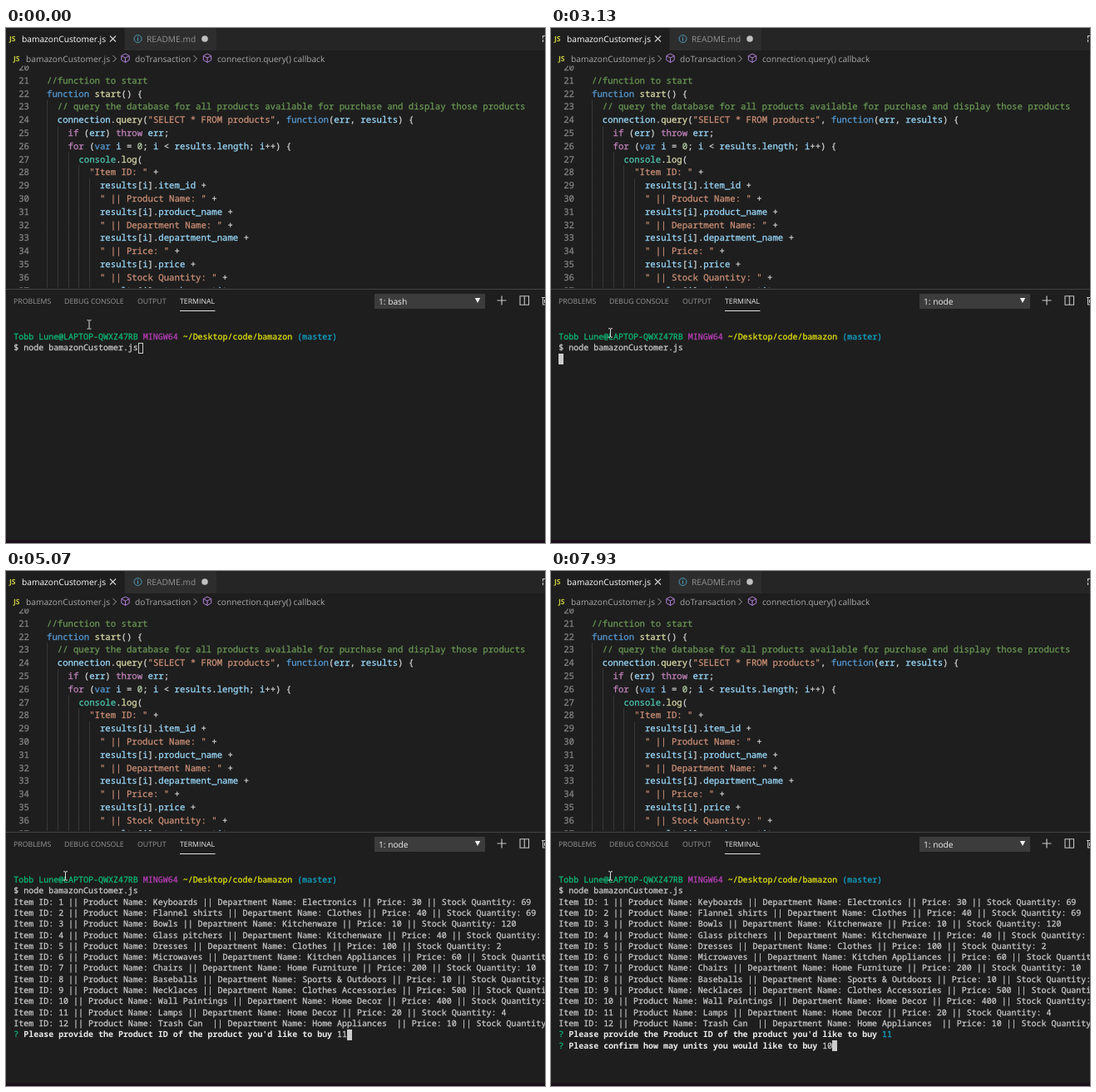
Recreate the animation shown at these times as an HTML page. Size 648 by 620 pixels, loop 8000 ms.

```html
<!DOCTYPE html>
<html lang="en">
<head>
<meta charset="utf-8">
<title>Terminal session</title>
<style>
  html, body { margin: 0; width: 100%; height: 100%; overflow: hidden; background: #1e1e1e; }
  svg { display: block; }
  text { white-space: pre; text-rendering: geometricPrecision; stroke-width: 0; }
  .ui { font: 10.2px "Open Sans", "Noto Sans", sans-serif; }
  .panel { font: 8.75px "Open Sans", "Noto Sans", sans-serif; }
  .icon { font: bold 8.6px "Open Sans", sans-serif; }
  .code { font: 10.66px "Noto Sans Mono", "DejaVu Sans Mono", monospace; stroke-width: .25px; }
  .term { font: 9.97px "Noto Sans Mono", "DejaVu Sans Mono", monospace; stroke-width: .25px; }
  .bold { font-weight: bold; stroke-width: 0; }
</style>
</head>
<body>
<svg id="stage" width="648" height="620" viewBox="0 0 648 620"></svg>
<script>
const LOOP = 8000;
const stage = document.getElementById('stage');

function set(el, attrs) {
  for (const k in attrs) el.setAttribute(k, attrs[k]);
  return el;
}
function add(tag, attrs, parent = stage) {
  const el = set(document.createElementNS('http://www.w3.org/2000/svg', tag), attrs);
  parent.append(el);
  return el;
}
const rect = (x, y, width, height, fill, parent) => add('rect', { x, y, width, height, fill }, parent);
const line = (d, stroke, w = 1, parent) =>
  add('path', { d, stroke, 'stroke-width': w, fill: 'none' }, parent);
// Text is inked with a thin stroke in its own colour where the class asks for it
const ink = color => ({ fill: color, stroke: color });
function text(x, y, str, color, cls, parent) {
  const el = add('text', { x, y, class: cls, ...ink(color) }, parent);
  el.textContent = str;
  return el;
}
// One text line made of [string, colour, class] parts
function rich(x, y, parts, cls, parent) {
  const el = add('text', { x, y, class: cls }, parent);
  for (const [str, color, sub = ''] of parts) {
    add('tspan', { class: sub, ...ink(color) }, el).textContent = str;
  }
  return el;
}

// Code editor
const TOKENS = /(\/\/.*)|("[^"]*")|\b(function|var)\b|\b(if|for|throw)\b|\b(console)\b|(\w+)(?=\()|(\b\d+)|([a-z_]\w*)/gi;
const COLORS = ['#6a9955', '#ce9178', '#569cd6', '#c586c0', '#4ec9b0', '#dcdcaa', '#b5cea8', '#9cdcfe'];
function highlight(src) {
  const parts = [];
  let last = 0;
  for (const m of src.matchAll(TOKENS)) {
    if (m.index > last) parts.push([src.slice(last, m.index), '#d4d4d4']);
    parts.push([m[0], COLORS[m.slice(1).findIndex(g => g !== undefined)]]);
    last = m.index + m[0].length;
  }
  parts.push([src.slice(last), '#d4d4d4']);
  return parts;
}
const field = name => `          results[i].${name} +`;
const label = name => `          " || ${name}: " +`;
const source = [
  '',
  '//function to start',
  'function start() {',
  '  // query the database for all products available for purchase and display those products',
  '  connection.query("SELECT * FROM products", function(err, results) {',
  '    if (err) throw err;',
  '    for (var i = 0; i < results.length; i++) {',
  '      console.log(',
  '        "Item ID: " +',
  field('item_id'), label('Product Name'),
  field('product_name'), label('Department Name'),
  field('department_name'), label('Price'),
  field('price'), label('Stock Quantity'),
  field('stock_quantity')
];
const CODE_X = 49, CODE_ADV = 6.396, CODE_LH = 15.8;
source.forEach((src, i) => {
  const y = 66.8 + (i - 1) * CODE_LH;
  const indent = src.search(/\S|$/);
  for (let c = 0; c < indent; c += 2) {
    rect(Math.round(CODE_X + c * CODE_ADV), y - 11.9, 1, CODE_LH, '#393939');
  }
  set(text(28, y, 20 + i, '#858585', 'code'), { 'text-anchor': 'end' });
  rich(CODE_X, y, highlight(src), 'code');
});

// Tabs
rect(0, 0, 648, 27, '#252526');
rect(0, 0, 142, 27, '#1e1e1e');
rect(143, 0, 110, 27, '#2d2d2d');
text(4, 16.2, 'JS', '#cbcb41', 'icon');
text(19, 17, 'bamazonCustomer.js', '#ffffff', 'ui');
line('M125 9.5l7 7m0-7l-7 7', '#d0d0d0', 1.1);
add('circle', { cx: 158.5, cy: 13, r: 4.5, fill: 'none', stroke: '#519aba' });
line('M158.5 12v3.6m0-5.4v1', '#519aba', 1.2);
text(169, 17, 'README.md', '#929292', 'ui');
add('circle', { cx: 239, cy: 13, r: 3.8, fill: '#c0c0c0' });
line('M648 9.5h-2.5v3M645.5 14v3', '#c5c5c5', 1.2);

// Breadcrumbs
rect(0, 27, 648, 18.5, '#1e1e1e');
text(9, 39.6, 'JS', '#cbcb41', 'icon');
text(24, 40.6, 'bamazonCustomer.js', '#a9a9a9', 'ui');
text(155, 40.6, 'doTransaction', '#a9a9a9', 'ui');
text(254, 40.6, 'connection.query() callback', '#a9a9a9', 'ui');
for (const x of [128.5, 225.5]) line(`M${x} 33l4 4l-4 4`, '#a0a0a0');
for (const x of [143.5, 242]) {
  line(`M${x} 31l4.7 2.5v5.2l-4.7 2.7l-4.7-2.7v-5.2zm-4.7 2.5l4.7 2.5l4.7-2.5m-4.7 2.5v5.4`, '#b180d7');
}

// Panel header
rect(0, 313, 648, 307, '#1e1e1e');
rect(0, 314, 648, 1, '#434343');
[['PROBLEMS', 9], ['DEBUG CONSOLE', 70], ['OUTPUT', 158], ['TERMINAL', 209]].forEach(([name, x]) =>
  text(x, 332.3, name, name === 'TERMINAL' ? '#e7e7e7' : '#979797', 'panel'));
rect(209, 340, 42.5, 1, '#e0e0e0');
rect(443, 320, 133, 18, '#3c3c3c');
const shell = text(448, 332.6, '', '#f0f0f0', 'ui');
add('path', { d: 'M563.8 325h6.4l-3.2 6z', fill: '#f0f0f0' });
line('M590.5 328h11M596 322.5v11', '#c5c5c5', 1.2);
line('M618 322.8h10.5v10.4h-10.5zM623.3 322.8v10.4', '#c5c5c5', 1.1);
line('M644 324.5h4M645.5 324.5v8.5h2.5M647.5 327v4', '#c5c5c5', 1.1);
rect(0, 616.5, 648, 4, '#1a101b');

// Terminal
const TERM_X = 9.3, TERM_ADV = 5.98, TERM_LH = 13.3;
const GREY = '#cccccc', GREEN = '#0dbc79', CYAN = '#11a8cd';
const baseline = row => 375 + row * TERM_LH;
const COMMAND = '$ node bamazonCustomer.js';
rich(TERM_X, baseline(0), [
  ['Tobb Lune@LAPTOP-QWXZ47RB ', GREEN],
  ['MINGW64 ', '#bc3fbc'],
  ['~/Desktop/code/bamazon ', '#e5e510'],
  ['(master)', CYAN]
], 'term');
text(TERM_X, baseline(1), COMMAND, GREY, 'term');

const products = [
  ['Keyboards', 'Electronics', 30, 69],
  ['Flannel shirts', 'Clothes', 40, 69],
  ['Bowls', 'Kitchenware', 10, 120],
  ['Glass pitchers', 'Kitchenware', 40, 20],
  ['Dresses', 'Clothes', 100, 2],
  ['Microwaves', 'Kitchen Appliances', 60, 20],
  ['Chairs', 'Home Furniture', 200, 10],
  ['Baseballs', 'Sports & Outdoors', 10, 50],
  ['Necklaces', 'Clothes Accessories', 500, 10],
  ['Wall Paintings', 'Home Decor', 400, 10],
  ['Lamps', 'Home Decor', 20, 4],
  ['Trash Can ', 'Home Appliances ', 10, 20]
];
const output = add('g', {});
products.forEach(([name, dept, price, stock], i) => text(TERM_X, baseline(i + 2),
  `Item ID: ${i + 1} || Product Name: ${name} || Department Name: ${dept} || Price: ${price} || Stock Quantity: ${stock}`,
  GREY, 'term', output));

function question(row, str) {
  const el = rich(TERM_X, baseline(row),
    [['? ', GREEN], [str + ' ', '#ececec', 'bold'], ['', GREY]], 'term');
  const answer = el.lastChild;
  return {
    row,
    col: str.length + 3,
    show(shown, value, done) {
      el.style.display = shown ? '' : 'none';
      answer.textContent = value;
      set(answer, ink(done ? CYAN : GREY));
    }
  };
}
const askId = question(14, "Please provide the Product ID of the product you'd like to buy");
const askUnits = question(15, 'Please confirm how may units you would like to buy');

const cursor = add('rect', { width: 5, height: 12, stroke: GREY });
const pointer = add('g', {});
line('M-2.5-5.2h2l.5.5l.5-.5h2M0-4.9v9.8M-2.5 5.2h2l.5-.5l.5.5h2', '#d8d8d8', 1, pointer);

// Event times in ms
const AT = {
  moveStart: 70, moveEnd: 730, focus: 800, run: 1530, shellName: 1670, list: 3200,
  id: [4330, 4800], idDone: 5730, units: [6930, 7270]
};
const typed = (str, times, t) => str.slice(0, times.filter(at => t >= at).length);
const ease = p => p * p * (3 - 2 * p);

function draw(t) {
  const p = ease(Math.min(1, Math.max(0, (t - AT.moveStart) / (AT.moveEnd - AT.moveStart))));
  set(pointer, { transform: `translate(${100 - 28.5 * p} ${357 + 10 * p})` });

  shell.textContent = t < AT.shellName ? '1: bash' : '1: node';
  output.style.display = t < AT.list ? 'none' : '';
  const id = typed('11', AT.id, t), units = typed('10', AT.units, t);
  askId.show(t >= AT.list, id, t >= AT.idDone);
  askUnits.show(t >= AT.idDone, units, false);

  let row = 1, col = COMMAND.length;
  if (t >= AT.idDone) { row = askUnits.row; col = askUnits.col + units.length; }
  else if (t >= AT.list) { row = askId.row; col = askId.col + id.length; }
  else if (t >= AT.run) { row = 2; col = 0; }
  set(cursor, {
    x: Math.round(TERM_X + col * TERM_ADV) + 0.5,
    y: Math.round(365.7 + row * TERM_LH) + 0.5,
    fill: t < AT.focus ? 'none' : GREY
  });
}

const start = performance.now();
function tick() {
  draw((performance.now() - start) % LOOP);
  requestAnimationFrame(tick);
}
tick();
</script>
</body>
</html>
```
